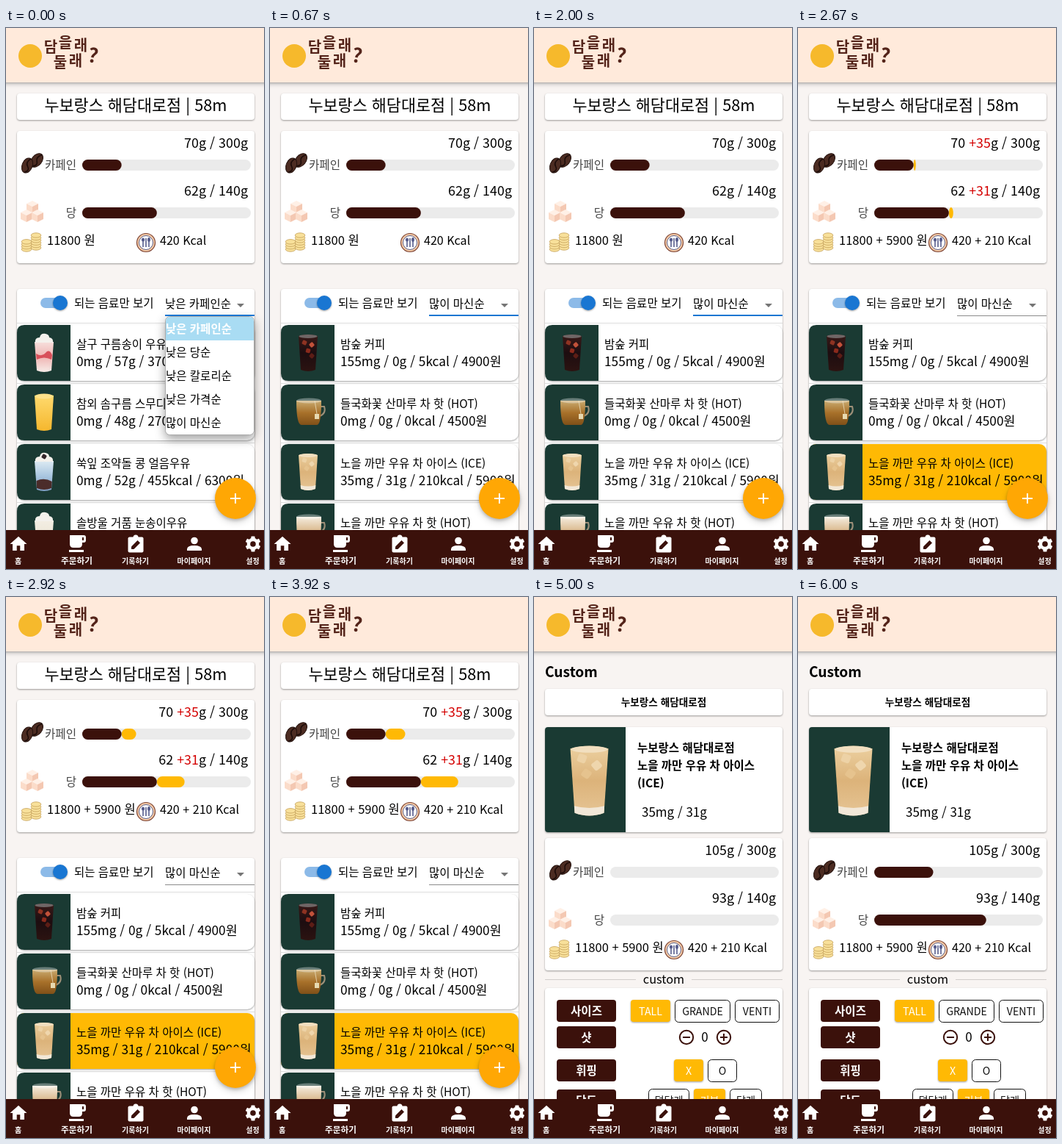
An HTML page for the animation above (6330 ms loop, 352 by 736 pixels).

```html
<!DOCTYPE html>
<html lang="ko">
<head>
<meta charset="utf-8">
<title>음료 고르기</title>
<style>
html, body { margin: 0; width: 100%; height: 100%; overflow: hidden; background: #f8f4f2; }
svg { display: block; width: 100%; height: 100%; }
text { font-family: 'Noto Sans CJK KR', 'Noto Sans CJK JP', 'Noto Sans CJK', sans-serif; white-space: pre; }
.card { fill: #fff; filter: drop-shadow(0 1px 1px rgba(0,0,0,.38)); }
.head { filter: drop-shadow(0 1.5px 1.5px rgba(0,0,0,.2)) drop-shadow(0 3px 2.5px rgba(0,0,0,.16)); }
.fab { filter: drop-shadow(0 2px 2px rgba(0,0,0,.2)) drop-shadow(0 4px 4px rgba(0,0,0,.16)); }
.menu { filter: drop-shadow(0 5px 7px rgba(0,0,0,.38)); }
</style>
</head>
<body>
<svg id="stage" viewBox="0 0 352 736"></svg>
<script>
const BROWN = '#3b110b', YELLOW = '#ffb904', GREEN = '#1a3a33', BLUE = '#1976d2';
const LOOP = 6330, TICK = 1000 / 12;
const CAFFEINE = [70 / 300, 105 / 300], SUGAR = [62 / 140, 93 / 140];
const SHOP = '누보랑스 해담대로점';

const text = (x, y, size, str, opt = '') =>
  `<text x="${x}" y="${y}" font-size="${size}" ${opt}>${str}</text>`;
const rect = (x, y, w, h, r, opt = '') =>
  `<rect x="${x}" y="${y}" width="${w}" height="${h}" rx="${r}" ${opt}/>`;
const card = (y, h) => rect(15, y, 324, h, 4, 'class="card"');
const at = (x, y, body, more = '') => `<g transform="translate(${x} ${y}) ${more}">${body}</g>`;
const path = (d, opt) => `<path d="${d}" ${opt}/>`;
const ellipse = (x, y, rx, ry, opt) => `<ellipse cx="${x}" cy="${y}" rx="${rx}" ry="${ry}" ${opt}/>`;
const MID = 'text-anchor="middle"', END = 'text-anchor="end"', BOLD = 'font-weight="700"';

// Drinks, each drawn around its own centre
const grad = (id, ...stops) => `<linearGradient id="${id}" x2="0" y2="1">` +
  stops.map((c, i) => `<stop offset="${i / (stops.length - 1)}" stop-color="${c}"/>`).join('') +
  '</linearGradient>';
const glass = fill => path('M-13 -23Q0 -27 13 -23L10 23Q0 27 -10 23Z', `fill="url(#${fill})"`);
const ice = (x, y, angle, fill) =>
  `<rect x="-3" y="-3" width="6" height="6" rx="1.5" transform="translate(${x} ${y}) rotate(${angle})" fill="${fill}"/>`;
const whip = path('M-12 -14Q-13 -21 -6 -21Q-5 -27 2 -26Q7 -25 7 -21Q13 -20 12 -14Z', 'fill="#f4f1ec"');
const shake = fill => path('M-13 -15H13L10 24Q0 28 -10 24Z', `fill="url(#${fill})"`) + whip;
const mug = (fill, top, h) =>
  `<path d="M17 ${top + 8}h5q3 9 -6 13" fill="none" stroke="#9c8f78" stroke-width="2"/>` +
  path(`M-16 ${top}H18Q18 ${top + h} 12 ${top + h}H-9Q-16 ${top + h} -16 ${top}Z`,
    `fill="url(#${fill})"`) +
  ellipse(1, top, 17, 3.5, 'fill="#fff" fill-opacity=".35"');
const latte = glass('latte') + ellipse(0, -22.5, 12.5, 2.4, 'fill="#f2dfc0"') +
  ice(-5, -16, 20, '#edd2a6') + ice(5, -11, 50, '#efd6ad') + ice(-2, -5, 35, '#e6c38e') +
  path('M-10.3 18Q0 21 10.3 18L10 23Q0 27 -10 23Z', 'fill="#f4eee4" fill-opacity=".85"');
const art = {
  berry: shake('berry') + path('M-11 1Q-3 6 2 0T11 3L10 9Q0 4 -10 9Z', 'fill="#d8505a"'),
  mango: glass('mango') + ellipse(0, -22, 12, 3.5, 'fill="#ffe28a"'),
  mint: shake('mint') + ice(0, -21, 30, '#33262a') + path('M-10.5 12Q0 7 10.7 13L10 22Q0 26 -10 22Z', 'fill="#4b2c2a"'),
  vanilla: shake('vanilla'),
  brew: glass('brew') + ellipse(0, -22.5, 12.5, 2.4, 'fill="#6f6666"') +
    ice(-5, -14, 25, '#8e3322') + ice(5, -11, 50, '#c2523a') + ice(0, -3, 15, '#8a2a1c') + ice(5, 4, 40, '#5c1d16'),
  tea: mug('tea', -16, 33) + path('M9 -16L12 2', 'stroke="#ece0c0" stroke-width=".8"') + rect(9, 2, 6, 7, 0, 'fill="#e7d9b0"'),
  latte,
  hot: mug('hot', -20, 40)
};

const before = [
  ['berry', '살구 구름송이 우유 한잔더', '0mg / 57g / 370kcal / 6100원'],
  ['mango', '참외 솜구름 스무디 한컵', '0mg / 48g / 270kcal / 6100원'],
  ['mint', '쑥잎 조약돌 콩 얼음우유', '0mg / 52g / 455kcal / 6300원'],
  ['vanilla', '솔방울 거품 눈송이우유', '0mg / 40g / 330kcal / 5700원']
];
const after = [
  ['brew', '밤숲 커피', '155mg / 0g / 5kcal / 4900원'],
  ['tea', '들국화꽃 산마루 차 핫 (HOT)', '0mg / 0g / 0kcal / 4500원'],
  ['latte', '노을 까만 우유 차 아이스 (ICE)', '35mg / 31g / 210kcal / 5900원'],
  ['hot', '노을 까만 우유 차 핫 (HOT)', '35mg / 30g / 250kcal / 5900원']
];
const row = ([kind, name, info], i) => at(15, 404 + 81 * i,
  rect(0, 0, 324, 76, 10, `class="card" ${kind === 'latte' ? 'id="pick"' : ''}`) +
  path('M73 0V76H10Q0 76 0 66V10Q0 0 10 0Z', `fill="${GREEN}"`) +
  at(37, 38, art[kind]) + text(81, 32, 15.5, name) + text(81, 56, 17.3, info) +
  '<path d="M0 79.5H324" stroke="#ddd"/>');

// Intake card
const bar = (y, name) => `<g transform="translate(104 ${y})" clip-path="url(#track)">` +
  rect(0, 0, 230, 15, 0, 'fill="#ebebeb"') +
  rect(0, 0, 0, 15, 7.5, `id="${name}More" fill="${YELLOW}"`) +
  rect(-230, 0, 230, 15, 7.5, `id="${name}" fill="${BROWN}"`) + '</g>';
const bean = (x, y, angle) => at(x, y,
  ellipse(0, 0, 7, 10.5, 'fill="#4c2c22" stroke="#22100c"') +
  path('M1 -10Q-4 -3 1 1T0 10', 'fill="none" stroke="#1c0c09" stroke-width="1.6"'), `rotate(${angle})`);
const cube = (x, y) => at(x, y,
  path('M0 -8L8 -4L0 0L-8 -4Z', 'fill="#fff0e6"') + path('M-8 -4L0 0V9L-8 5Z', 'fill="#fbdcca"') +
  path('M8 -4L0 0V9L8 5Z', 'fill="#f4c8b2"'));
const stack = (x, y, n) => Array.from({ length: n }, (_, i) =>
  ellipse(x, y - 3.4 * i, 6.8, 3.2, 'fill="#f8e09a" stroke="#c4a058" stroke-width=".8"')).join('');
const plate = at(191, 292,
  '<circle r="12.5" fill="#f3c9a5" stroke="#7d4333" stroke-width="1.2"/><circle r="9.5" fill="#fff" stroke="#59618e"/>' +
  path('M-4 -6V6M0 -6V6M4 -6V6', 'stroke="#565c8c" stroke-width="1.6"') +
  ellipse(4, -4, 2, 3, 'fill="#565c8c"') + ellipse(-4, -4, 2.2, 2.5, 'fill="#565c8c"'));
const amounts = (caffeine, sugar, price, kcal) =>
  text(330, 163, 17.9, `${caffeine}g / 300g`, END) + text(330, 228, 17.9, `${sugar}g / 140g`, END) +
  text(56, 294.5, 16.5, `${price} 원`) + text(210, 294.5, 16.1, `${kcal} Kcal`);
const plus = n => `<tspan fill="#d40000">+${n}</tspan>`;
const intake = (name, body) => card(140, 180) +
  bean(42, 180, 38) + bean(29, 187, 22) + cube(36, 243) + cube(28, 255) + cube(43, 255) +
  stack(41, 299, 6) + stack(28, 301, 4) + plate +
  text(96, 192, 15.6, '카페인', `${END} fill="#444"`) + text(96, 257, 15.6, '당', `${END} fill="#444"`) +
  bar(179, name + 'Caf') + bar(244, name + 'Sug') + body;

// List page
const options = ['낮은 카페인순', '낮은 당순', '낮은 칼로리순', '낮은 가격순', '많이 마신순'];
const menu = '<g id="menu">' +
  rect(217.5, 392.5, 121, 161, 6, 'class="menu" fill="#fff" stroke="#aaa"') +
  path('M218 425V399Q218 393 224 393H332Q338 393 338 399V425Z', 'fill="#a9dcf3"') +
  options.map((s, i) => text(218, 415 + 32 * i, 15.5, s, i ? '' : `fill="#fff" ${BOLD}`)).join('') + '</g>';
const listPage = '<g id="list">' +
  card(89, 36) + text(177, 113, 21.8, `${SHOP} | 58m`, MID) +
  intake('a', `<g id="plain">${amounts(70, 62, 11800, 420)}</g>` +
    `<g id="added">${amounts('70 ' + plus(35), '62 ' + plus(31), '11800 + 5900', '420 + 210')}</g>`) +
  card(355, 400) + rect(47, 367, 34, 14, 7, 'fill="#8cbae8"') +
  `<circle cx="74" cy="374" r="10" class="card" style="fill:${BLUE}"/>` +
  text(93, 380, 15.5, '되는 음료만 보기') +
  '<text id="sort" x="217" y="381" font-size="15.5"></text>' +
  path('M315 375H325L320 380Z', 'fill="#757575"') + path('M15 401.5H339', 'stroke="#ddd"') +
  `<g id="before">${before.map(row).join('')}</g><g id="after">${after.map(row).join('')}</g>` + menu +
  '<rect id="line" x="217" width="122"/>' +
  '<circle cx="313" cy="640" r="28" fill="#ffa704" class="fab"/>' +
  '<circle id="ripple" cx="320" cy="651" fill="#fff" fill-opacity=".25"/>' +
  path('M306 640H320M313 633V647', 'stroke="#fff" stroke-width="2"') + '</g>';

// Custom page
const label = (y, s) => rect(31, y, 81, 30, 4, `fill="${BROWN}"`) + text(71.5, y + 20.5, 15.5, s, `${MID} ${BOLD} fill="#fff"`);
const choice = (x, y, w, s, on) =>
  (on ? rect(x, y, w, 30, 4, `class="card" style="fill:${YELLOW}"`)
      : rect(x + .5, y + .5, w - 1, 30, 5, 'fill="#fff" stroke="#111"')) +
  text(x + w / 2, y + 20.5, 14.2, s, `${MID} fill="${on ? '#fff' : '#111'}"`);
const round = (x, d) => at(x, 599, `<circle r="9.2"/><path d="${d}"/>`);
const customPage = '<g id="custom">' +
  text(15, 109, 19.2, 'Custom', BOLD) +
  card(125, 36) + text(177, 148, 13.6, SHOP, `${MID} ${BOLD}`) +
  card(177, 143) + path('M125 177V320H19Q15 320 15 316V181Q15 177 19 177Z', `fill="${GREEN}"`) +
  at(75.5, 250, latte, 'scale(2 1.9)') +
  [SHOP, '노을 까만 우유 차 아이스', '(ICE)'].map((s, i) => text(141, 211 + 24 * i, 15.5, s, BOLD)).join('') +
  text(147, 299, 17, '35mg / 31g') +
  at(0, 188, intake('b', amounts(105, 93, '11800 + 5900', '420 + 210'))) +
  path('M15 520.5H139M215 520.5H339', 'stroke="#d2cecc"') + text(177, 526, 16.3, 'custom', MID) +
  card(532, 220) +
  label(548, '사이즈') + choice(132, 548, 54, 'TALL', 1) + choice(192, 548, 76, 'GRANDE') + choice(274, 548, 61, 'VENTI') +
  label(584, '샷') + text(233, 605, 17, '0', MID) +
  `<g fill="none" stroke="${BROWN}" stroke-width="2">` + round(208, 'M-5 0H5') + round(259, 'M-5 0H5M0 -5V5') + '</g>' +
  label(629, '휘핑') + choice(191, 629, 40, 'X', 1) + choice(237, 629, 40, 'O') +
  label(670, '당도') + choice(156, 669, 56, '덜달게') + choice(218, 669, 43, '기본', 1) + choice(267, 669, 44, '달게') + '</g>';

// Header and bottom navigation
const header = rect(-10, -10, 372, 84, 0, 'fill="#ffeadb" class="head"') +
  '<circle cx="33" cy="38" r="16" fill="#f6b92c"/>' +
  [['담', 61, 33], ['을', 81, 27], ['래', 102, 31], ['둘', 74, 54], ['래', 95, 52]]
    .map(([s, x, y]) => text(x, y, 20, s, `${MID} ${BOLD} fill="#54241a"`)).join('') +
  at(117, 47, text(0, 0, 27, '?', `${MID} ${BOLD} fill="#54241a"`), 'rotate(10)');
const teeth = [0, 60, 120].map(a => `<rect x="-2.6" y="-10.5" width="5.2" height="21" rx="1" transform="rotate(${a})"/>`).join('');
const icons = [
  path('M-2.3 9V2.2H2.3V9H8V0H11.5L0 -10.3L-11.5 0H-8V9Z', ''),
  path('M-10 -12H9Q12 -12 12 -9V-5Q12 -2 9 -2H7V0Q7 5 2 5H-5Q-10 5 -10 0ZM7 -9V-5H9V-9ZM-11 8H9V11H-11Z', 'fill-rule="evenodd"'),
  rect(-10.5, -9.5, 21, 21, 2) + '<circle cy="-9" r="3.5"/>' +
    path('M-6 7V3.5L2.5 -5L6 -1.5L-2.5 7Z', `fill="${BROWN}"`),
  '<circle cy="-4.5" r="4.8"/>' + path('M-10 9V6.5Q-9 2 0 2T10 6.5V9Z', ''),
  teeth + `<circle r="8.3"/><circle r="3.8" fill="${BROWN}"/>`
];
const tabs = ['홈', '주문하기', '기록하기', '마이페이지', '설정'];
const nav = rect(0, 683, 352, 53, 0, `fill="${BROWN}"`) + '<g fill="#fff">' +
  icons.map((icon, i) => at(17 + 80 * i, 702, icon) +
    text(16.5 + 80 * i, 729, i === 1 ? 11.7 : 10, tabs[i], `${MID} ${BOLD}`)).join('') + '</g>';

const stage = document.getElementById('stage');
stage.innerHTML = '<defs><clipPath id="track"><rect width="230" height="15" rx="7.5"/></clipPath>' +
  grad('berry', '#f6dfdc', '#efb5b3', '#f7ece8') + grad('mango', '#ffdb70', '#f5b72e') +
  grad('mint', '#dceaf2', '#a9c6e0', '#7e9cc0') + grad('vanilla', '#f3eee3', '#e6dccb') +
  grad('brew', '#3a1a18', '#1d0d10', '#2c1311') + grad('tea', '#c9ab70', '#a8712a', '#805018') +
  grad('latte', '#ecd0a0', '#dcb37a', '#e6c595') + grad('hot', '#f5ede0', '#d9b78a', '#c99c68') + '</defs>' +
  rect(0, 0, 352, 736, 0, 'fill="#f8f4f2"') + listPage + customPage + header + nav;

const $ = id => document.getElementById(id);
const show = (id, on) => $(id).setAttribute('display', on ? 'inline' : 'none');
const slide = (id, part) => $(id).setAttribute('x', 230 * (part - 1));
const clamp = v => Math.max(0, Math.min(1, v));

// The screen refreshes twelve times a second
function draw(ms) {
  const tick = Math.floor((ms + 4) / TICK), t = tick * TICK;
  const sorted = tick >= 8, picked = tick >= 32, custom = tick >= 60;
  show('list', !custom);
  show('custom', custom);
  show('menu', !sorted);
  show('before', !sorted);
  show('after', sorted);
  show('plain', !picked);
  show('added', picked);
  $('sort').textContent = options[sorted ? 4 : 0];
  $('line').setAttribute('y', picked ? 391 : 390);
  $('line').setAttribute('height', picked ? 1 : 2);
  $('line').setAttribute('fill', picked ? '#8c8c8c' : BLUE);
  $('pick').style.fill = picked ? YELLOW : '#fff';
  $('ripple').setAttribute('r', tick < 58 ? 0 : 4 + 4 * (tick - 58));

  const grow = picked ? clamp((t - 2620) / 400) : 0, load = clamp((t - 5000) / 400);
  [['Caf', CAFFEINE], ['Sug', SUGAR]].forEach(([name, [now, next]]) => {
    const more = $(`a${name}More`);
    slide('a' + name, now);
    more.setAttribute('x', 230 * now);
    more.setAttribute('width', 230 * (next - now) * grow);
    slide('b' + name, next * load);
  });
}

const start = performance.now();
(function frame() {
  draw((performance.now() - start) % LOOP);
  requestAnimationFrame(frame);
})();
</script>
</body>
</html>
```
